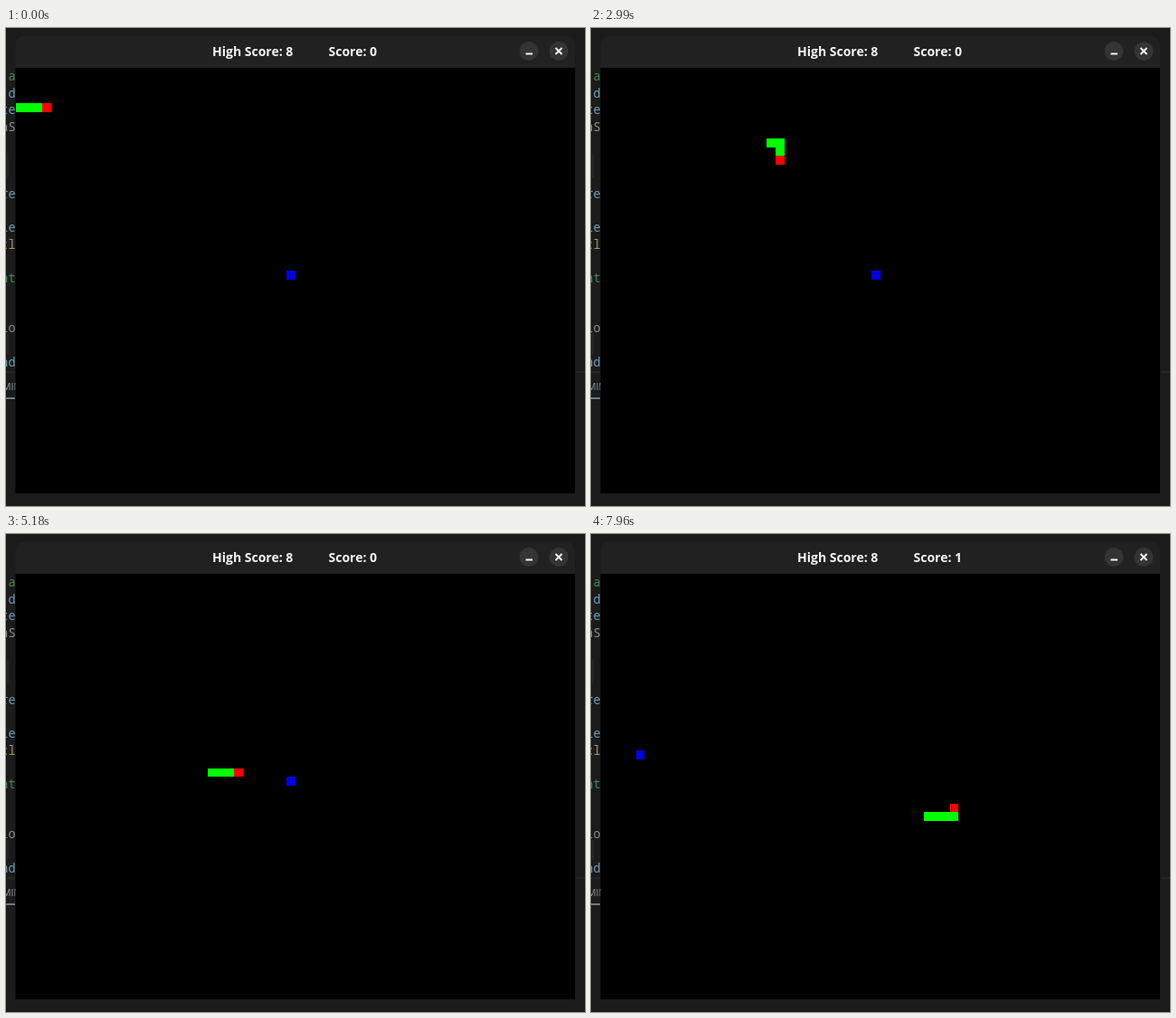
Write an HTML page that moves like this. It is 640x528 px and loops after 8 s.

```html
<!DOCTYPE html>
<html lang="en">
<head>
<meta charset="utf-8">
<title>Snake</title>
<style>
  html, body { margin: 0; width: 100%; height: 100%; overflow: hidden; background: #000; }
  svg { display: block; width: 100vw; height: 100vh; }
  .title { font: 700 14px "Open Sans", sans-serif; fill: #f4f4f2; white-space: pre; }
  .code { font: 13.5px "Noto Sans Mono", monospace; text-anchor: end; }
  .panel { font: 10.5px "Open Sans", sans-serif; fill: #8c979c; }
</style>
</head>
<body>
<svg viewBox="0 0 640 528">
  <rect width="640" height="528" fill="#1b1b1c"/>
  <g id="editor"></g>
  <path d="M2 138v27M2 338v22" stroke="#303034"/>
  <path d="M0 380h10M630 380h10" stroke="#303034"/>
  <path d="M0 409h10" stroke="#8c979c" stroke-width="1.5"/>
  <path d="M10.500 44V18a9 9 0 0 1 9-9H620a9 9 0 0 1 9 9V44Z" fill="#212122"/>
  <rect x="10.5" y="44" width="618.5" height="470" fill="#000"/>
  <text class="title" x="228" y="31">High Score: 8</text>
  <text class="title" x="356.5" y="31" id="score"></text>
  <g fill="#343435">
    <circle cx="578" cy="25.500" r="10.500"/>
    <circle cx="611" cy="25.500" r="10.500"/>
  </g>
  <path d="M574.500 28.500h7.500M607.500 22l7 7M614.500 22l-7 7" stroke="#f4f4f2" stroke-width="2"/>
  <g id="board"></g>
</svg>
<script>
const NS = 'http://www.w3.org/2000/svg';
const $ = id => document.getElementById(id);

function add(parent, tag, attrs) {
  const el = document.createElementNS(NS, tag);
  for (const k in attrs) el.setAttribute(k, attrs[k]);
  return parent.appendChild(el);
}

// Visible ends of the code lines behind the window.
const BLUE = '#6f9cb4', GREEN = '#47855a', GREY = '#8c8c88', SAND = '#a09468';
[
  ['a', 58, GREEN], ['d', 77, BLUE], ['te', 95, BLUE], ['aS', 114, GREY],
  ['re', 188, BLUE], ['le', 225, BLUE], ['cl', 244, SAND], ['nt', 281, GREEN],
  ['lo', 336, GREY], ['nd', 374, BLUE]
].forEach(([s, y, fill]) => add($('editor'), 'text', { class: 'code', x: 10.5, y, fill }).textContent = s);
add($('editor'), 'text', { class: 'panel', x: -4, y: 400 }).textContent = 'MIN';

const LOOP = 8000, SHOT = 199, LAST_SHOT = 40;
const TICKS_PER_SHOT = 1.525, PHASE = 0.85;
const START = 3, EAT = 47, RESPAWN = 36;
const CW = 9.645, CH = 9.77, X0 = 11, Y0 = 44;

// Corner cells of the route, expanded to single steps.
const corners = [[0, 4], [13, 4], [13, 8], [20, 8], [20, 22], [31, 22], [31, 27], [40, 27], [40, 26]];
const route = [corners[0]];
for (const [cx, cy] of corners.slice(1)) {
  let [x, y] = route[route.length - 1];
  while (x !== cx || y !== cy) {
    x += Math.sign(cx - x);
    y += Math.sign(cy - y);
    route.push([x, y]);
  }
}

const cell = fill => add($('board'), 'rect', { fill, 'shape-rendering': 'crispEdges' });
const food = cell('#0000e6');
const body = Array.from({ length: 4 }, () => cell('#00ff00'));
const head = cell('#ff0000');

function place(el, [cx, cy]) {
  const px = c => Math.round(X0 + c * CW);
  const py = c => Math.round(Y0 + c * CH - 0.3);
  el.setAttribute('x', px(cx));
  el.setAttribute('y', py(cy));
  el.setAttribute('width', px(cx + 1) - px(cx));
  el.setAttribute('height', py(cy + 1) - py(cy));
}

const show = (el, on) => el.setAttribute('visibility', on ? 'visible' : 'hidden');

function draw(t) {
  const shot = Math.min(LAST_SHOT, Math.floor((t + 4) / SHOT));
  const tick = Math.floor(shot * TICKS_PER_SHOT + PHASE);
  const at = tick + START;
  const eaten = tick >= EAT;

  place(head, route[at]);
  body.forEach((el, i) => {
    const on = i < 3 || eaten;
    show(el, on);
    if (on) place(el, route[at - 1 - i]);
  });
  place(food, eaten ? [4, 20] : [31, 23]);
  show(food, !eaten || shot >= RESPAWN);
  $('score').textContent = 'Score: ' + (eaten ? 1 : 0);
}

const began = performance.now();
function loop() {
  draw((performance.now() - began) % LOOP);
  requestAnimationFrame(loop);
}
loop();
</script>
</body>
</html>
```
